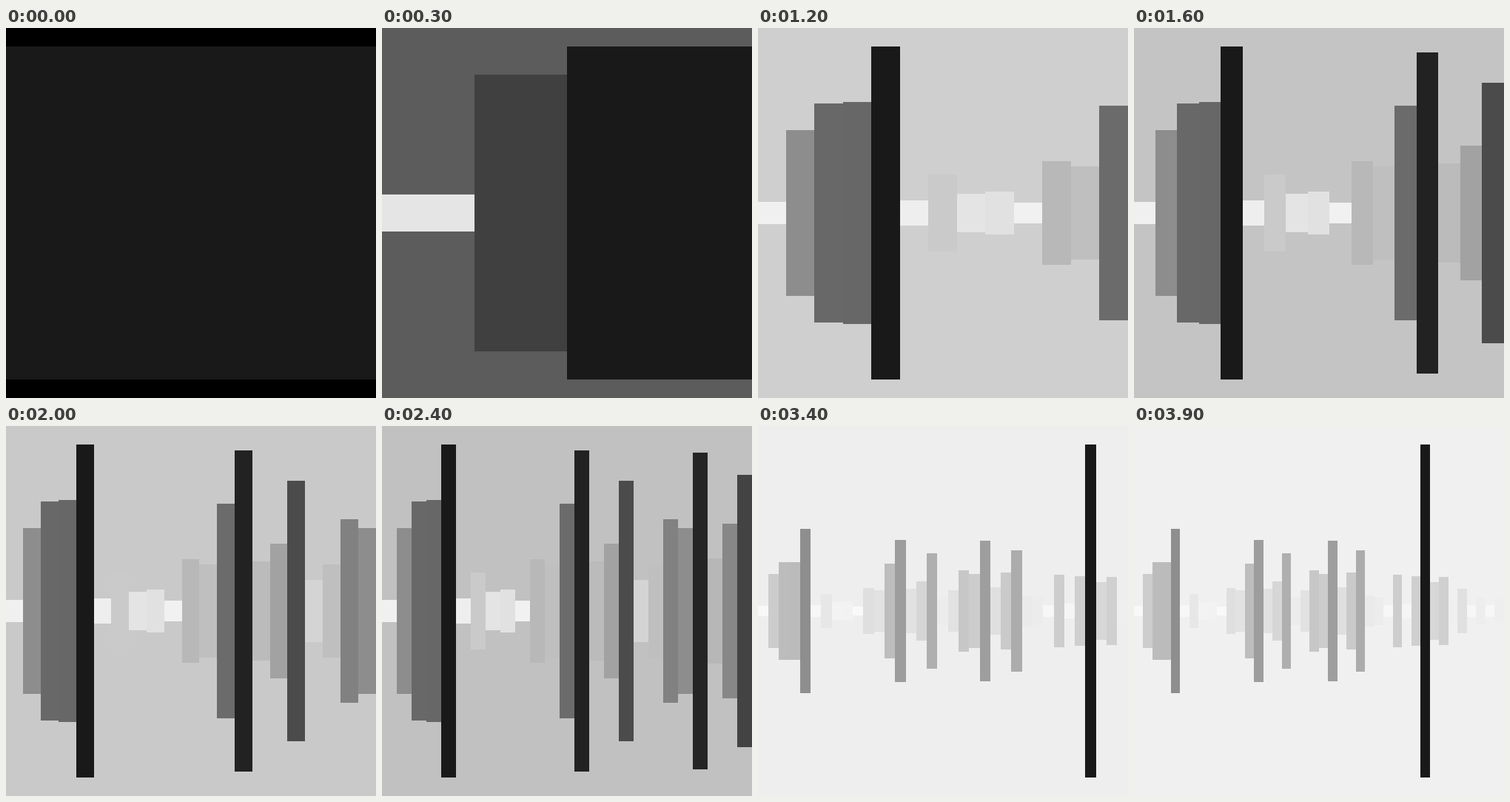
Write an HTML page with a canvas that moves like this. It is 500 px wide and 500 px high and loops after 6.9 s.

```html
<!DOCTYPE html>
<html lang="en">
<head>
<meta charset="utf-8">
<title>Growing bar series</title>
<style>
  html, body { margin: 0; width: 100%; height: 100%; overflow: hidden; background: #000; }
  canvas { display: block; width: 100vw; height: 100vh; }
</style>
</head>
<body>
<canvas id="stage" width="500" height="500"></canvas>
<script>
const SIZE = 500, STEP = 100, LOOP = 6900, CAP = 0.9;
const series = [
  30, 224, 296, 299, 500, 34, 104, 52, 58, 28,
  140, 126, 290, 434, 134, 182, 352, 84, 126, 248,
  224, 428, 142, 236, 368, 94, 84, 34, 220, 44,
  212, 1126, 176, 207, 70, 135, 36, 81, 36, 74
];
const ctx = document.getElementById('stage').getContext('2d');

function gray(ink) {
  const level = Math.round(255 * (1 - ink));
  return `rgb(${level},${level},${level})`;
}

// Bars are normalised to the largest value so far; the backdrop is their mean power.
function draw(count) {
  const shown = series.slice(0, count);
  const peak = Math.max(...shown);
  const levels = shown.map(v => v / peak);
  const power = levels.reduce((sum, v) => sum + v * v, 0) / count;

  ctx.fillStyle = gray(power);
  ctx.fillRect(0, 0, SIZE, SIZE);

  levels.forEach((v, i) => {
    const level = Math.min(v, CAP);
    const left = Math.floor(i * SIZE / count);
    const right = Math.floor((i + 1) * SIZE / count);
    const half = Math.round(level * SIZE / 2);
    ctx.fillStyle = gray(level);
    ctx.fillRect(left, SIZE / 2 - half, right - left, half * 2);
  });
}

const start = performance.now();

function tick() {
  const t = (performance.now() - start) % LOOP;
  draw(Math.min(series.length, Math.floor(t / STEP) + 1));
  requestAnimationFrame(tick);
}
tick();
</script>
</body>
</html>
```
